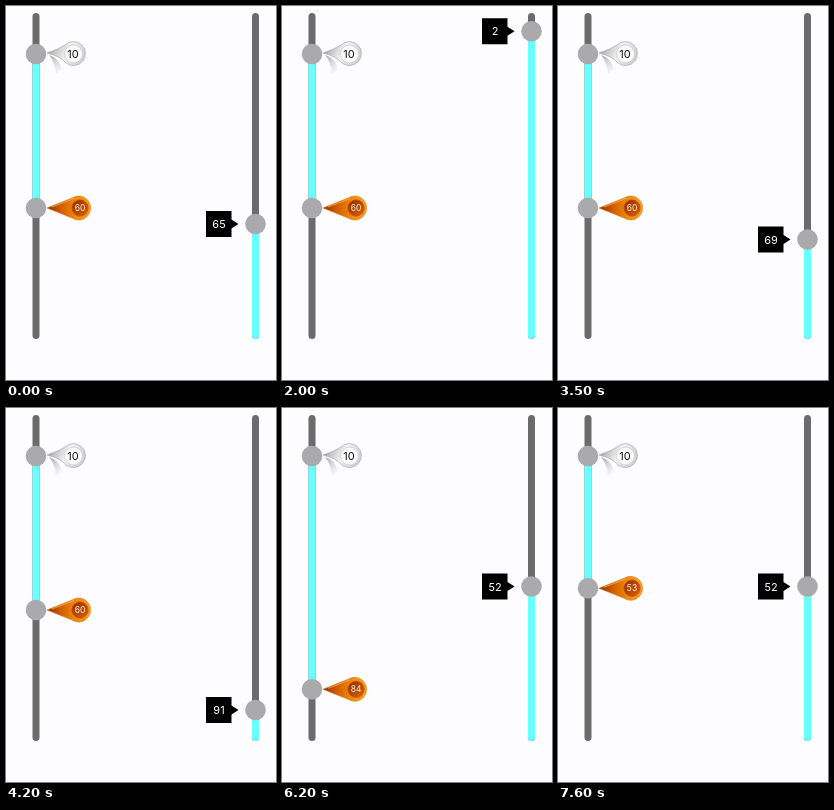
Write an HTML page that moves like this. It is 270 px wide and 374 px high and loops after 8 s.

```html
<!DOCTYPE html>
<html lang="en">
<head>
<meta charset="utf-8">
<title>Vertical sliders</title>
<style>
  html, body { margin: 0; width: 100%; height: 100%; overflow: hidden; background: #fdfcff; }
  svg { display: block; width: 100%; height: 100%; }
  text { font-family: Inter, Roboto, sans-serif; text-anchor: middle; }
  .track { stroke-width: 7; stroke-linecap: round; }
  .grey { stroke: #6b6b6b; }
  .cyan { stroke: #68ffff; }
  .thumb { fill: #aaa9ab; }
</style>
</head>
<body>
<svg viewBox="0 0 270 374">
  <defs>
    <linearGradient id="silver" x1="0" y1="0" x2="1" y2="0.3">
      <stop offset="0" stop-color="#777"/>
      <stop offset="0.3" stop-color="#c4c4c4"/>
      <stop offset="0.6" stop-color="#f2f2f2"/>
      <stop offset="1" stop-color="#d2d2d2"/>
    </linearGradient>
    <linearGradient id="shade" x1="0" y1="0" x2="0.6" y2="1">
      <stop offset="0" stop-color="#888" stop-opacity="0.75"/>
      <stop offset="1" stop-color="#bbb" stop-opacity="0.1"/>
    </linearGradient>
    <linearGradient id="flame" x1="0" y1="0" x2="1" y2="0">
      <stop offset="0" stop-color="#8a3000"/>
      <stop offset="0.3" stop-color="#cf5a00"/>
      <stop offset="0.65" stop-color="#f08a0c"/>
      <stop offset="1" stop-color="#ff9d1c"/>
    </linearGradient>
    <linearGradient id="ember" x1="0" y1="0" x2="1" y2="1">
      <stop offset="0" stop-color="#8f2b00"/>
      <stop offset="1" stop-color="#d9640a"/>
    </linearGradient>
  </defs>

  <path class="track grey" d="M30 10.5V329.5"/>
  <path id="range" class="track cyan" style="stroke-linecap:butt"/>
  <path class="track grey" d="M249.5 10.5V329.5"/>
  <path id="fill" class="track cyan"/>

  <g transform="translate(0 48)">
    <path d="M43 1Q54 4 56 16L50 20Q49 8 43 1Z" fill="url(#shade)"/>
    <path d="M41 -1Q53 -5 59 -9A12 12 0 1 1 60 9Q54 2 41 -1Z" fill="url(#silver)" stroke="#aaa" stroke-width="0.7"/>
    <circle cx="67.5" r="9" fill="#fafafa" stroke="#d0d0d0" stroke-width="0.8"/>
    <circle class="thumb" cx="30" r="10.3"/>
    <text x="67" y="4" font-size="11" fill="#111">10</text>
  </g>

  <g id="low">
    <path d="M41 0L66 -10A12 12 0 1 1 66 10Z" fill="url(#flame)" stroke="#d87b1c" stroke-width="0.6"/>
    <path d="M46 -1L68 -9.5" stroke="#ffb04a" stroke-width="0.8"/>
    <circle cx="74" r="8.2" fill="url(#ember)" stroke="#c45a08" stroke-width="0.8"/>
    <circle class="thumb" cx="30" r="10.3"/>
    <text id="lowText" x="74" y="3" font-size="8.5" fill="#fff0df"></text>
  </g>

  <g id="right">
    <path d="M200 -13H225.5V-4.5L232.5 0L225.5 4.5V13H200Z" fill="#000"/>
    <circle class="thumb" cx="249.5" r="10.3"/>
    <text id="rightText" x="213" y="4" font-size="11" fill="#fff"></text>
  </g>
</svg>
<script>
const LOOP = 8000, STEP = 100;
const TOP = 17, UNIT = 3.08;
const LAG = 30; // the number trails the thumb slightly

// [time in ms, thumb centre y]
const rightKeys = [
  [100, 218], [1200, 89], [1900, 28], [2300, 17], [2400, 17], [2900, 119],
  [3300, 214], [4200, 302], [4400, 325], [4600, 325], [5100, 196], [5250, 178.5]
];
const lowKeys = [[5600, 202], [6500, 321], [6700, 324], [6900, 279], [7400, 180.3]];

const el = id => document.getElementById(id);

function at(keys, t) {
  if (t <= keys[0][0]) return keys[0][1];
  for (let i = 1; i < keys.length; i++) {
    const [t0, y0] = keys[i - 1], [t1, y1] = keys[i];
    if (t < t1) return y0 + (y1 - y0) * (t - t0) / (t1 - t0);
  }
  return keys[keys.length - 1][1];
}

function place(name, keys, t) {
  const y = at(keys, t);
  el(name).setAttribute("transform", `translate(0 ${y})`);
  el(name + "Text").textContent = Math.floor((at(keys, t - LAG) - TOP) / UNIT);
  return y;
}

function draw(time) {
  const t = Math.floor((time % LOOP) / STEP) * STEP;
  el("range").setAttribute("d", `M30 48V${place("low", lowKeys, t)}`);
  el("fill").setAttribute("d", `M249.5 ${place("right", rightKeys, t)}V329.5`);
}

const start = performance.now();
function tick() {
  draw(performance.now() - start);
  requestAnimationFrame(tick);
}
tick();
</script>
</body>
</html>
```
